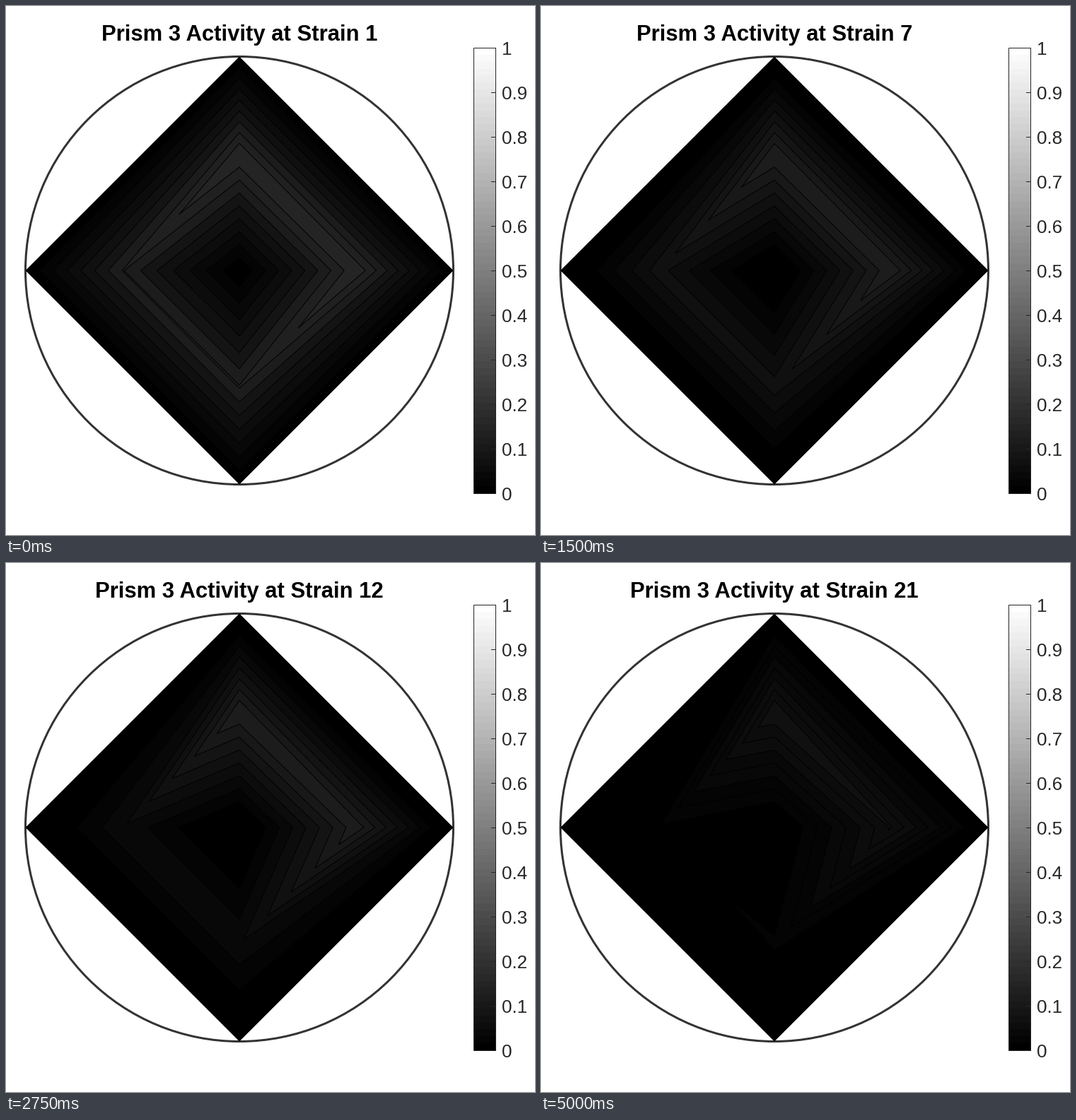
Write a matplotlib script that moves like this. It is 748 by 748 pixels and loops after 5.25 s.

```python
import numpy as np
import matplotlib.pyplot as plt
from matplotlib.animation import FuncAnimation
from matplotlib.patches import Circle, Polygon, Rectangle

SIZE, DPI = 748, 88
PX = 72 / DPI                    # points per pixel
CX, CY, R = 330, 374, 302        # disc centre and radius
MID = 164.5                      # radius of the measured ring
STEPS = 9                        # contour steps up to the maximum
BAR_X, BAR_W, BAR_TOP, BAR_BOTTOM = 661, 31.5, 59, 689
INK = "#262626"

# Activity per strain; side values are in contour steps of the top one
STRAIN = [1, 5, 7, 9, 12, 17, 20]
PEAK = [0.165, 0.139, 0.134, 0.131, 0.127, 0.100, 0.076]
RIGHT = [8.88, 8.90, 8.88, 8.75, 8.72, 8.56, 8.12]
LEFT = [7.066, 6.29, 5.48, 4.70, 3.82, 2.42, 1.78]
BOTTOM = [7.10, 6.28, 5.48, 4.73, 3.81, 2.59, 2.14]

plt.rcParams["font.family"] = "Liberation Sans"
gray = plt.get_cmap("gray", 64)

fig = plt.figure(figsize=(SIZE / DPI, SIZE / DPI), dpi=DPI, facecolor="white")
ax = fig.add_axes([0, 0, 1, 1])
ax.axis("off")

# Colour bar
ax.imshow(np.arange(64)[::-1, None], cmap=gray, vmin=0, vmax=63,
          extent=(BAR_X, BAR_X + BAR_W, BAR_BOTTOM, BAR_TOP),
          aspect="auto", interpolation="nearest")
ax.add_patch(Rectangle((BAR_X, BAR_TOP), BAR_W, BAR_BOTTOM - BAR_TOP,
                       fill=False, ec=INK, lw=PX))
for k in range(11):
    y = BAR_BOTTOM - (BAR_BOTTOM - BAR_TOP) * k / 10
    ax.plot([BAR_X + BAR_W - 6, BAR_X + BAR_W], [y, y], color=INK, lw=PX)
    ax.text(701, y + 10, f"{k / 10:g}", size=26 * PX, color=INK, va="baseline")

# Disc outline and the black base of the plot
ax.add_patch(Circle((CX, CY), R + 0.5, fc="white", ec="#333333", lw=3 * PX))
ax.add_patch(Polygon([(CX + R, CY), (CX, CY - R), (CX - R, CY), (CX, CY + R)],
                     fc="black", lw=0, zorder=1.5))
title = ax.text(CX, 49, "", size=31 * PX, weight="bold", color="black",
                ha="center", va="baseline")

ax.set_xlim(0, SIZE)
ax.set_ylim(SIZE, 0)

theta = np.arange(5) * np.pi / 2
radius = np.array([0, MID, R])[:, None]
X = CX + radius * np.cos(theta)
Y = CY - radius * np.sin(theta)
contours = []


def update(i):
    while contours:
        contours.pop().remove()
    strain = i + 1
    title.set_text(f"Prism 3 Activity at Strain {strain}")
    peak, right, left, bottom = (np.interp(strain, STRAIN, v)
                                 for v in (PEAK, RIGHT, LEFT, BOTTOM))
    Z = np.zeros((3, 5))
    Z[1] = right, STEPS, left, bottom, right
    levels = np.arange(STEPS)
    shades = [gray(int(64 * peak * k / STEPS)) for k in levels]
    contours.append(ax.contourf(X, Y, Z, [*levels, 2 * STEPS],
                                colors=shades, zorder=2))
    contours.append(ax.contour(X, Y, Z, levels[1:], colors="black",
                               linewidths=PX, zorder=3))
    return [title]


anim = FuncAnimation(fig, update, frames=21, interval=250,
                     repeat=True, repeat_delay=0, blit=False)
plt.show()
```
